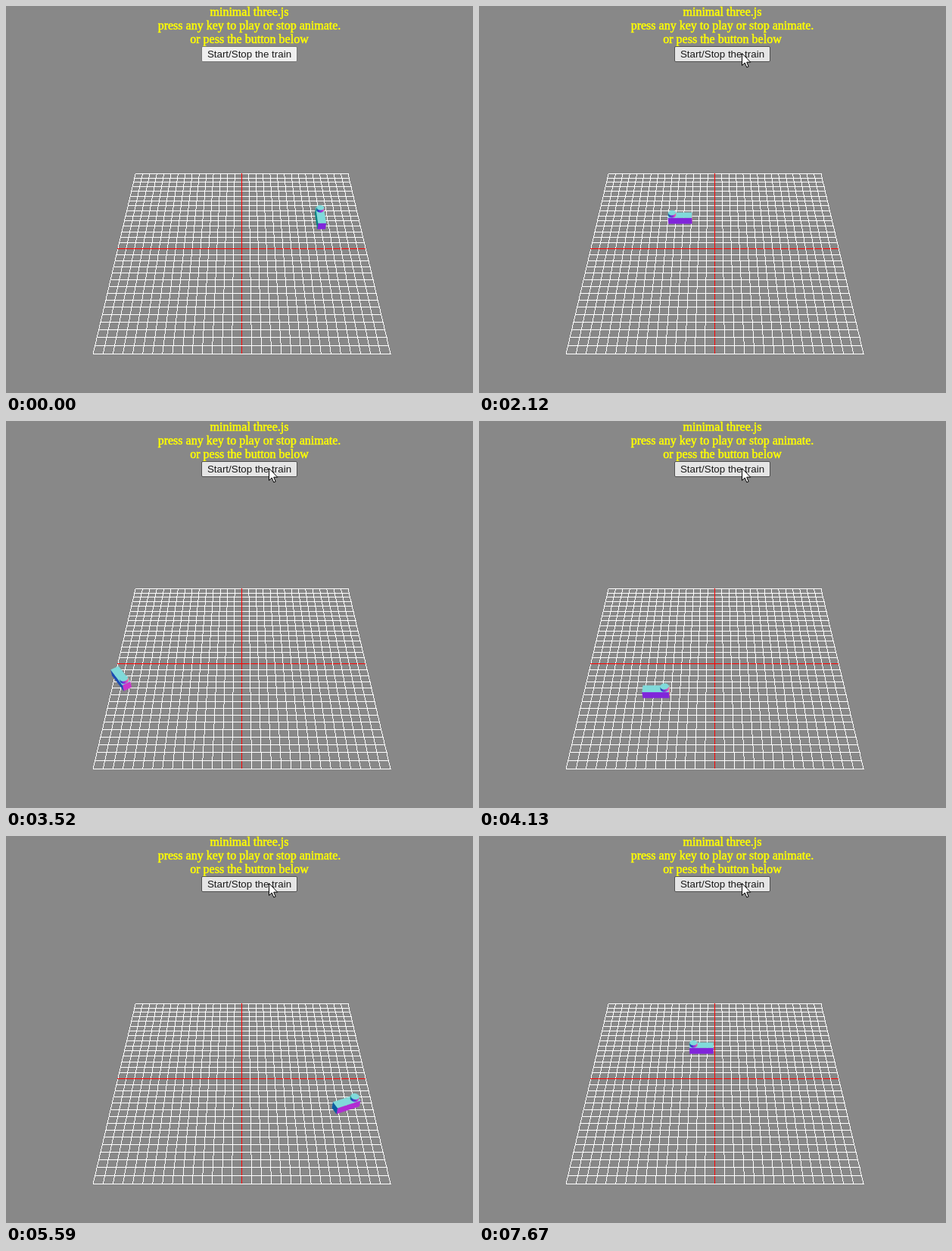
Write an HTML page with a canvas that moves like this. It is 617 px wide and 511 px high and loops after 8 s.

```html
<!DOCTYPE html>
<html lang="en">
<head>
<meta charset="utf-8">
<title>minimal three.js</title>
<style>
  html, body { margin: 0; width: 100%; height: 100%; overflow: hidden; background: #888; }
  canvas, svg { position: absolute; left: 0; top: 0; }
  #info {
    position: absolute; left: 26px; top: -1px; width: 591px; text-align: center;
    font: 16px/18px "Liberation Serif", "Times New Roman", serif;
    color: #ff0; -webkit-text-stroke: .5px #ff0;
  }
  button {
    position: absolute; left: 258px; top: 53px; width: 127px; height: 21px;
    box-sizing: border-box; margin: 0; padding: 0; border: 1px solid #767676; border-radius: 2px;
    font: 13.333px/18px "Liberation Sans", Arial, sans-serif;
    color: #1a1a1a; background: #efefef; white-space: nowrap; pointer-events: none;
  }
  button.hover { background: #e5e5e5; border-color: #4f4f4f; }
  button.active { background: #f5f5f5; border-color: #8d8d8d; }
</style>
</head>
<body>
<canvas id="floor" width="617" height="511"></canvas>
<canvas id="scene" width="617" height="511"></canvas>
<div id="info">minimal three.js<br>press any key to play or stop animate.<br>or pess the button below</div>
<button id="btn">Start/Stop the train</button>
<svg width="617" height="511">
  <path id="cursor" d="M.5 .5V16.5L4.2 13 6.8 19 9.2 18 6.7 12.2H11.7Z" fill="#fff" stroke="#000"/>
</svg>
<script>
const LOOP = 8000, START = 1020;
const CX = 311.5, CY = 320.5, FOCAL = 694.5, DIST = 636.4, C45 = Math.SQRT1_2;
const $ = id => document.getElementById(id);
const floor = $('floor').getContext('2d'), scene = $('scene').getContext('2d');
const btn = $('btn'), cursor = $('cursor');

// Camera looks at the origin, pitched down by 45 degrees.
function project([x, y, z]) {
  const k = FOCAL / (DIST - (y + z) * C45);
  return [CX + x * k, CY + (z - y) * C45 * k];
}

// Colour from the view-space normal.
function normalColor([x, y, z]) {
  const c = v => Math.round(127.5 * (v + 1));
  return `rgb(${c(x)},${c((y - z) * C45)},${c((y + z) * C45)})`;
}

function drawGrid() {
  const half = 150, n = 30;
  for (let i = 0; i <= n; i++) {
    const k = -half + i * 2 * half / n;
    floor.fillStyle = i === n / 2 ? '#f00' : '#fff';

    const [x0, y] = project([-half, 0, k]), [x1] = project([half, 0, k]);
    floor.fillRect(Math.floor(x0), Math.floor(y), Math.round(x1 - x0) + 1, 1);

    const [ax, ay] = project([k, 0, -half]), [bx, by] = project([k, 0, half]);
    for (let row = Math.floor(ay); row <= Math.floor(by); row++) {
      const p = Math.min(1, Math.max(0, (row + .5 - ay) / (by - ay)));
      floor.fillRect(Math.floor(ax + (bx - ax) * p), row, 1, 1);
    }
  }
}

// Linear lookup in rows of [time, ...values].
function lerpTable(rows, t) {
  let i = 0;
  while (i < rows.length - 2 && t >= rows[i + 1][0]) i++;
  const a = rows[i], b = rows[i + 1];
  const p = Math.min(1, Math.max(0, (t - a[0]) / (b[0] - a[0])));
  return a.slice(1).map((v, j) => v + (b[j + 1] - v) * p);
}

// Rounded track: straights of 200 joined by half circles of radius 50.
function track(s) {
  const lap = 200 + Math.PI * 50;
  const sign = Math.floor(s / lap) % 2 ? -1 : 1;
  const h = s % lap, a = Math.max(0, h - 200) / 50;
  const x = h < 200 ? 100 - h : -100 - 50 * Math.sin(a);
  return { x: x * sign, z: -50 * Math.cos(a) * sign, dx: -Math.cos(a) * sign, dz: Math.sin(a) * sign };
}

function face(points, normal) {
  const p = points.map(project);
  let area = 0;
  p.forEach(([x, y], i) => {
    const [u, v] = p[(i + 1) % p.length];
    area += x * v - u * y;
  });
  if (area <= 0) return;
  scene.fillStyle = scene.strokeStyle = normalColor(normal);
  scene.beginPath();
  p.forEach(q => scene.lineTo(...q));
  scene.closePath();
  scene.fill();
  scene.stroke();
}

// A prism over an outline in train space: f along the heading, r to its right.
function prism(pose, outline, y0, y1) {
  const turn = ([f, r], y) => [f * pose.dx - r * pose.dz, y, f * pose.dz + r * pose.dx];
  const at = (p, y) => {
    const [x, , z] = turn(p, 0);
    return [pose.x + x, y, pose.z + z];
  };
  outline.forEach((p, i) => {
    const q = outline[(i + 1) % outline.length];
    const len = Math.hypot(q[0] - p[0], q[1] - p[1]);
    const normal = turn([(q[1] - p[1]) / len, (p[0] - q[0]) / len], 0);
    face([at(p, y0), at(q, y0), at(q, y1), at(p, y1)], normal);
  });
  face(outline.map(p => at(p, y1)), [0, 1, 0]);
}

const BODY = [[15, -5], [15, 5], [-15, 5], [-15, -5]];
const CHIMNEY = Array.from({ length: 24 }, (_, i) => {
  const a = i * Math.PI / 12;
  return [10 + 4.6 * Math.cos(a), 4.6 * Math.sin(a)];
});

function drawTrain(pose) {
  scene.clearRect(0, 0, 617, 511);
  scene.lineWidth = .3;
  prism(pose, BODY, 0, 10);
  prism(pose, CHIMNEY, 10, 14);
}

// Picture steps: time and step count.
const STEPS = [[1020, 0], [1890, 11], [2730, 22], [3590, 33], [4440, 44], [5280, 55], [6130, 66], [6970, 77], [7670, 86]];
const TIMES = STEPS.map(([t, n]) => [n, t]);
// Distance travelled along the track.
const TRAVEL = [[1000, 0], [2120, 144], [3520, 310.8], [4820, 480.3], [5590, 577], [6820, 731.4], [7670, 831]];
const POINTER = [[210, 562, 468], [450, 455, 270], [620, 376, 110], [770, 350, 52], [860, 347, 62], [940, 347, 62]];

function render(t) {
  if (t < START) {
    drawTrain({ x: 100, z: -50, dx: 0, dz: -1 });
  } else {
    const step = Math.floor(lerpTable(STEPS, t + 5)[0] + 1e-6);
    drawTrain(track(lerpTable(TRAVEL, lerpTable(TIMES, step)[0])[0]));
  }

  const tick = 210 + Math.floor((t - 210) / 81) * 81;
  const [x, y] = t < 210 ? [578, 495] : lerpTable(POINTER, tick);
  cursor.setAttribute('transform', `translate(${Math.round(x)} ${Math.round(y)})`);
  cursor.style.display = t < 70 ? 'none' : '';
  btn.className = t < 770 ? '' : t >= 1020 && t < 1100 ? 'active' : 'hover';
}

drawGrid();
const begin = performance.now();
function frame() {
  render((performance.now() - begin) % LOOP);
  requestAnimationFrame(frame);
}
frame();
</script>
</body>
</html>
```
